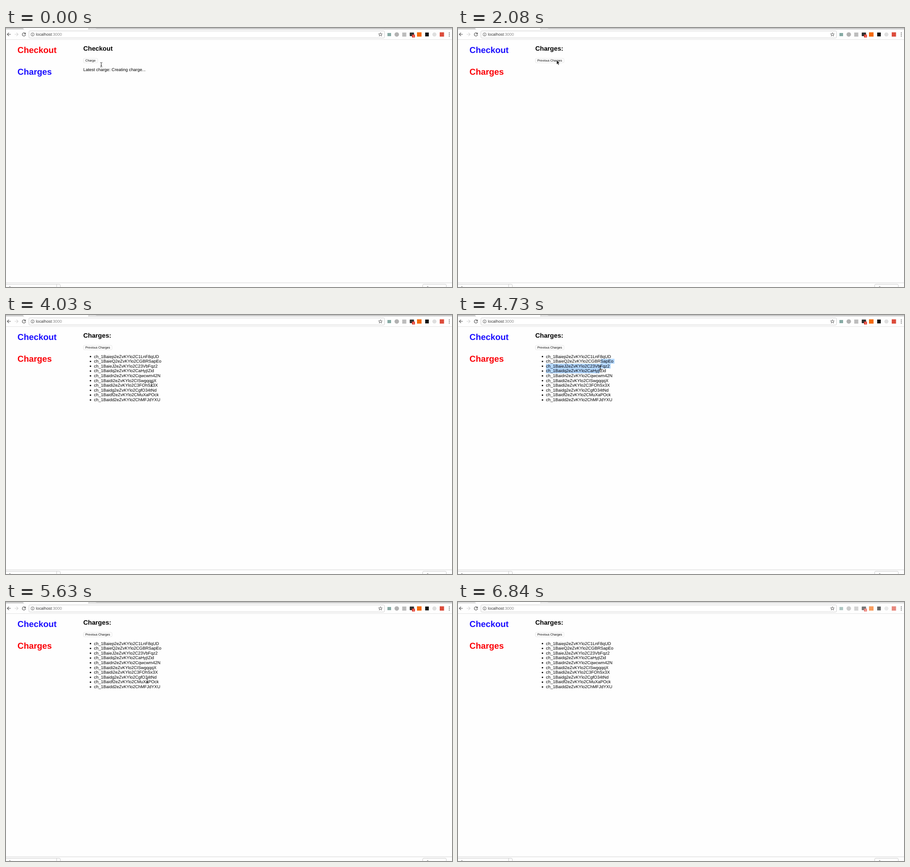
An HTML page that plays this animation: 981x571 px, repeating every 6940 ms.

```html
<!DOCTYPE html>
<html lang="en">
<head>
<meta charset="utf-8">
<title>Checkout</title>
<style>
  html, body { margin: 0; width: 100%; height: 100%; overflow: hidden; background: #fefefe; }
  svg { display: block; width: 981px; height: 571px; }
  text { font-family: "Liberation Sans", Arial, sans-serif; font-size: 9.44px; text-rendering: geometricPrecision; white-space: pre; }
  .nav { font-size: 18.88px; font-weight: bold; }
  .title { font-size: 14.2px; font-weight: bold; }
  .label { font-size: 6.86px; }
  .button { fill: #fff; stroke: #d6d6d6; stroke-width: .6; }
  .line { fill: none; stroke: #555; stroke-width: 1.2; }
</style>
</head>
<body>
<svg viewBox="0 0 981 571">
  <!-- browser toolbar -->
  <g id="strip" fill="#cecece">
    <path d="M0 0H37L40 3.3H0Z M180 3.3L182 0H981V3.3Z"/>
    <path d="M182 0H197L199 1.6H184Z" fill="#ececec"/>
  </g>
  <path d="M0 25.5H981" stroke="#e3e3e3"/>
  <path class="line" d="M10.5 14H3M6.5 10.3L2.8 14L6.5 17.7"/>
  <path class="line" style="stroke:#d2d2d2" d="M19 14H26.5M23 10.3L26.7 14L23 17.7"/>
  <path class="line" d="M42.2 11.8A3.6 3.6 0 1 0 43 14.8"/>
  <path d="M43.4 9.8V13.7H39.5Z" fill="#555"/>
  <rect x="50.5" y="6.5" width="782" height="15.5" rx="2" fill="#fff" stroke="#cfcfcf"/>
  <circle class="line" cx="58.5" cy="14.2" r="3.6" style="stroke-width:.9"/>
  <path d="M58.5 13.7V16.4M58.5 12V12.9" stroke="#555"/>
  <text x="65.8" y="17.3" style="font-size:8.85px" fill="#333">localhost<tspan fill="#888">:3000</tspan></text>
  <path class="line" style="stroke-width:.9" d="M823.5 10.2L824.7 13H827.6L825.3 14.9L826.2 17.9L823.5 16.1L820.8 17.9L821.7 14.9L819.4 13H822.3Z"/>
  <g id="icons">
    <rect x="839" y="11" width="8" height="7" fill="#86aaa4"/>
    <circle cx="859.5" cy="14.3" r="4.9" fill="#b2b2b2"/>
    <rect x="871.5" y="10" width="9" height="9" fill="#bdbdbd"/>
    <rect x="888" y="10" width="9.5" height="8" rx="1" fill="#333"/>
    <rect x="893" y="14.5" width="6.5" height="6.5" rx="1" fill="#e23b2e"/>
    <text x="894.8" y="20" style="font-size:5.5px" fill="#fff">1</text>
    <rect x="904" y="9.5" width="10" height="9.5" fill="#f56a0a"/>
    <rect x="922" y="10" width="8" height="8.5" fill="#151515"/>
    <circle cx="942.3" cy="14.3" r="4.5" fill="#dedede"/>
    <rect x="954" y="9.5" width="9.5" height="9.5" fill="#dc4c3c"/>
  </g>
  <g fill="#555"><circle cx="975" cy="10.8" r="1"/><circle cx="975" cy="14.3" r="1"/><circle cx="975" cy="17.8" r="1"/></g>

  <!-- page -->
  <text id="navCheckout" class="nav" x="25.3" y="55.4">Checkout</text>
  <text id="navCharges" class="nav" x="25.3" y="102.6">Charges</text>
  <g id="checkout">
    <text class="title" x="170" y="50.2">Checkout</text>
    <rect class="button" x="170.3" y="67" width="31.4" height="9.6" rx="2"/>
    <text class="label" x="174.5" y="74">Charge</text>
    <text id="latest" x="170" y="94.5"></text>
  </g>
  <g id="charges">
    <text class="title" x="170" y="50.2">Charges:</text>
    <rect class="button" x="170.3" y="67" width="62.8" height="9.6" rx="2"/>
    <text class="label" x="174.5" y="74">Previous Charges</text>
    <g id="marks" fill="#b3d7ff"></g>
    <g id="list"></g>
  </g>

  <!-- download shelf -->
  <path d="M0 561.8H981" stroke="#d4d4d4"/>
  <g fill="#fff" stroke="#c8c8c8">
    <path d="M0 565H117Q119.5 565 119.5 567.5V572M111.5 565V572"/>
    <path d="M916.5 572V567.5Q916.5 565 919 565H966Q968.5 565 968.5 567.5V572"/>
  </g>
  <path d="M7 570.5H10M926 570.5H929" stroke="#777"/>

  <g id="cursor">
    <g id="beam" fill="none" stroke-linecap="round">
      <path d="M-2 -5Q0 -5 0 -3.6Q0 -5 2 -5M0 -3.6V3.6M-2 5Q0 5 0 3.6Q0 5 2 5M-1 1.5H1" stroke="#222" stroke-width=".9"/>
    </g>
    <path id="arrow" d="M0 0V9.3L2.2 7.3L3.7 10.7L5.3 10L3.8 6.7H6.7Z" fill="#000" stroke="#fff" stroke-width=".6"/>
    <path id="hand" d="M-1 4V-3Q0 -4.4 1 -3V0L4 1Q4.6 1.4 4.3 3L3.4 6H-1.3L-3.6 2.4Q-3.4 1 -2.2 2Z" fill="#fff" stroke="#000" stroke-width=".8"/>
  </g>
</svg>
<script>
const LOOP = 6940, PITCH = 10.62, LEFT = 193.6;
const ids = [
  "Baiep2eZvKYlo2C1LnF8qUD", "BaieQ2eZvKYlo2CGBRSapEo", "BaieJ2eZvKYlo2C23VbFqz2",
  "Baidq2eZvKYlo2CaHyjIZid", "Baidn2eZvKYlo2Cqwcwm42N", "Baidi2eZvKYlo2CISwgqqqX",
  "Baidi2eZvKYlo2C3FOhSx3X", "Baidg2eZvKYlo2CgfO34tNd", "Baidf2eZvKYlo2CMuXaPOck",
  "Baidd2eZvKYlo2ChMFJdYXU"
].map(id => "ch_1" + id);

// time, cursor shape, x, y
const moves = [
  [0, "beam", 209.5, 81], [180, "beam", 184.7, 81],
  [470, "arrow", 141, 80], [650, "hand", 100, 89], [830, "hand", 86, 89.5],
  [1370, "arrow", 163, 77], [1540, "arrow", 219, 65.5], [1900, "arrow", 218, 69], [2080, "arrow", 217, 71],
  [2620, "arrow", 262, 132], [2790, "arrow", 308, 205], [2960, "arrow", 323, 232],
  [3140, "arrow", 324, 231], [3310, "arrow", 325, 229],
  [3490, "arrow", 332, 212], [3670, "beam", 335, 187], [3850, "beam", 328, 170],
  [4030, "beam", 320.5, 153], [4210, "beam", 314, 88], [4380, "beam", 313.5, 102],
  [4560, "beam", 313, 117], [4740, "beam", 312, 150], [4910, "beam", 310.5, 174],
  [5800, "arrow", 520, 290], [5990, "arrow", 875, 505], [6180, "", 0, 0]
];
// time, last selected row, x where the selection ends
const drags = [[0, 0, 0], [4560, 3, 312], [4740, 5, 312], [4910, 8, 308.5], [5630, 0, 0]];

const el = id => document.getElementById(id);
const show = (id, on) => el(id).setAttribute("visibility", on ? "inherit" : "hidden");
const at = (steps, t) => steps.findLast(step => step[0] <= t);
const add = (parent, tag, attrs) => {
  const node = document.createElementNS("http://www.w3.org/2000/svg", tag);
  for (const key in attrs) node.setAttribute(key, attrs[key]);
  return parent.appendChild(node);
};

const rows = ids.map((id, i) => {
  const y = 94.5 + i * PITCH;
  add(el("list"), "circle", { cx: 185.8, cy: y - 2.8, r: 1.6 });
  const label = add(el("list"), "text", { x: LEFT, y });
  label.textContent = id;
  const mark = add(el("marks"), "rect", { y: y - 8.5, height: PITCH + .1 });
  return { mark, end: LEFT + label.getComputedTextLength() + 2.4 };
});

function select(last, endX) {
  rows.forEach((row, i) => {
    const start = i === 1 ? 313.8 : LEFT;
    const end = i === last ? endX : row.end;
    const on = last > 0 && i >= 1 && i <= last;
    row.mark.setAttribute("x", start);
    row.mark.setAttribute("width", on ? Math.max(0, end - start) : 0);
  });
}

function draw(now) {
  const t = now % LOOP;
  const [, shape, x, y] = at(moves, t);
  const [, last, endX] = at(drags, t);
  const onCharges = t >= 1190, faded = t >= 6840;

  el("navCheckout").setAttribute("fill", onCharges ? "#1a0dff" : "#fb0007");
  el("navCharges").setAttribute("fill", onCharges ? "#fb0007" : "#1a0dff");
  show("checkout", !onCharges);
  show("charges", onCharges);
  show("list", onCharges && t >= 2440);
  el("latest").textContent = "Latest charge: " + (t < 180 ? "Creating charge..." : ids[0]);
  select(last, endX);

  for (const name of ["beam", "arrow", "hand"]) show(name, name === shape);
  el("cursor").setAttribute("transform", `translate(${x} ${y})`);
  el("icons").setAttribute("opacity", faded ? .65 : 1);
  el("strip").setAttribute("opacity", faded ? .65 : 1);
}

function tick() {
  draw(performance.now());
  requestAnimationFrame(tick);
}
tick();
</script>
</body>
</html>
```
